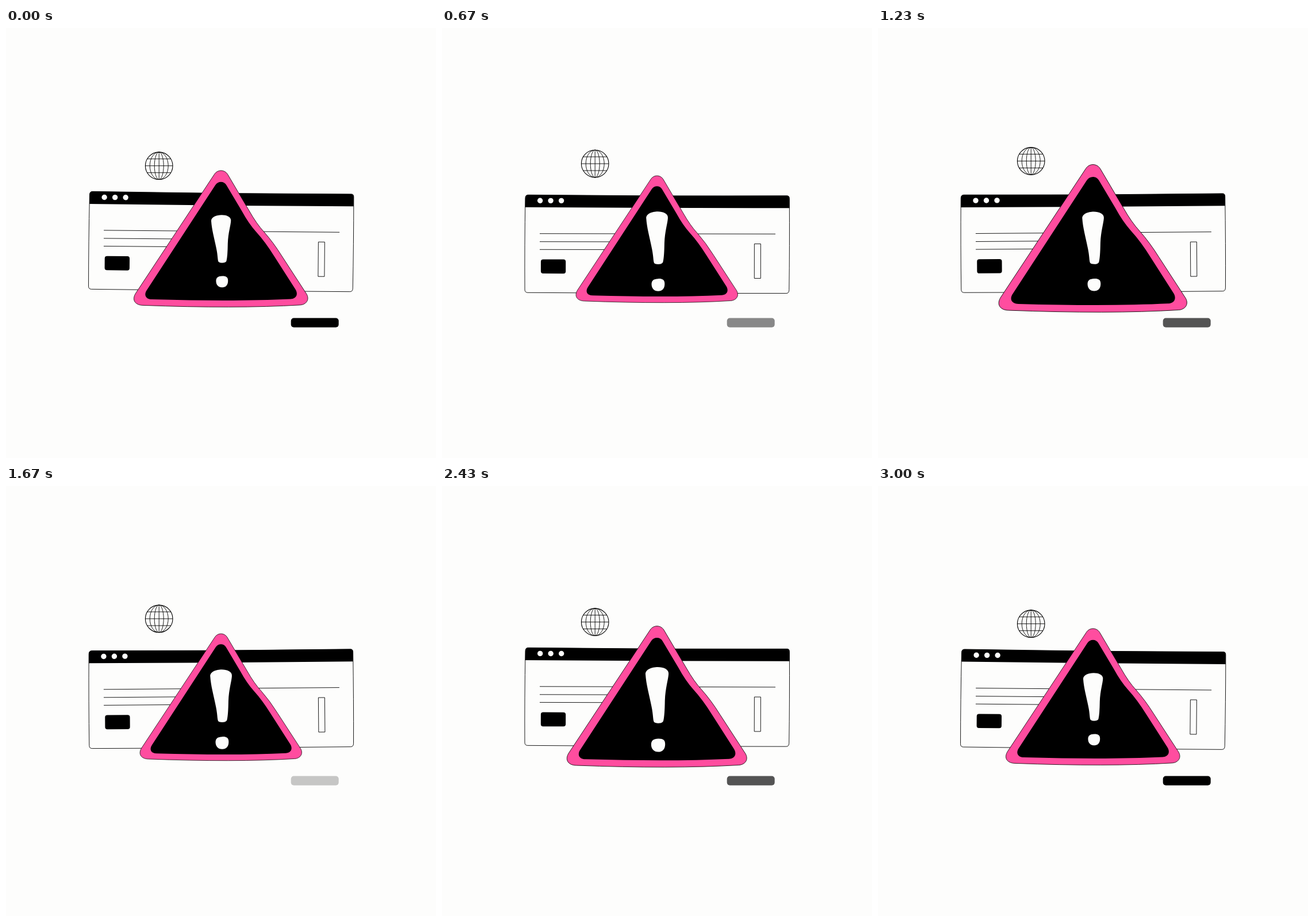
An HTML page with a canvas for the animation above (3030 ms loop, 748 px wide and 748 px high).

```html
<!DOCTYPE html>
<html lang="en">
<head>
<meta charset="utf-8">
<title>Warning</title>
<style>
html, body { margin: 0; width: 100%; height: 100%; overflow: hidden; background: #fdfdfc; }
canvas { display: block; width: 748px; height: 748px; }
</style>
</head>
<body>
<canvas id="stage" width="748" height="748"></canvas>
<script>
const ctx = document.getElementById('stage').getContext('2d');
const LOOP = 3030, FRAMES = 91, PULSE = 30;
const PAPER = '#fdfdfc', INK = '#000', PINK = '#ff4d9f';

const outer = new Path2D(
  'M362.5 254.5 C368 246 380 246 385.5 254.5 L423 318 Q436 341 449 355 Q465 373 480 397 L521 460' +
  ' C530 472 522 481.5 511 481.8 Q400 488.5 238 482.3 C225 482 218 473 226 461 Z');
const inner = new Path2D(
  'M364 273.5 C368.5 266 379.5 266 383.5 273.5 L410 318 Q422 340 435 354.5 Q451 372 466.5 397 L503 454' +
  ' C509 463 505 471 495 471.4 Q400 476 254 472 C243 472 239.5 464 245 456 Z');
const stem = new Path2D(
  'M357 336 C356 322.5 392 321 391.3 335 C391 343 386.5 356 385.8 375 Q385.5 397 383.5 405' +
  ' C382 410 371 409 369.5 406.5 C368 403 368.5 396 366 384 C362 364 358 351 357 336 Z');
const dot = new Path2D(
  'M376 431.5 C383 431.3 386.4 433.5 386.2 440 C386 447.5 382 451.2 376 451.2' +
  ' C369.5 451.2 365.6 447 365.4 440.5 C365.3 434 369 431.7 376 431.5 Z');
const frame = new Path2D(
  'M150 286.2 Q374 288.6 600 287 Q604.2 287 604.2 292 Q604.8 376 603.9 451 Q603.8 456.8 599 456.8' +
  ' Q374 457.6 149 456.2 Q144.2 456 144.2 451 Q143.6 376 144.8 292 Q144.8 286.2 150 286.2 Z');
const header = new Path2D(
  'M150 286.2 Q374 288 600 287 Q604.2 287 604.2 292 L604.2 308.4 Q374 309 144.6 307.8 L144.8 292 Q144.8 286.2 150 286.2 Z');

function line(x1, y1, x2, y2) {
  ctx.beginPath();
  ctx.moveTo(x1, y1);
  ctx.lineTo(x2, y2);
  ctx.stroke();
}

function disc(x, y, r) {
  ctx.beginPath();
  ctx.arc(x, y, r, 0, 7);
  ctx.fill();
}

function block(x, y, w, h, r) {
  ctx.beginPath();
  ctx.roundRect(x, y, w, h, r);
  ctx.fill();
}

function about(x, y, angle, scale, draw) {
  ctx.save();
  ctx.translate(x, y);
  ctx.rotate(angle);
  ctx.scale(scale, scale);
  ctx.translate(-x, -y);
  draw();
  ctx.restore();
}

function ease(u) {
  u = Math.min(1, Math.max(0, u));
  return u < 0.5 ? 8 * u ** 4 : 1 - 8 * (1 - u) ** 4;
}

// Swells over 15.1 frames, shrinks over 11.9, rests for 3.
function pulse(n, start) {
  const p = (n - start + 4 * PULSE) % PULSE;
  return ease(p / 15.1) - ease((p - 15.1) / 11.9);
}

// Sharp flash, decay, quick return.
function flash(n) {
  const p = n % 9;
  const fade = q => 0.15 + 0.85 * Math.exp(-q / 2);
  return p < 6 ? fade(p) : fade(6) + (1 - fade(6)) * (p - 6) / 3;
}

function drawGlobe(y) {
  const x = 266.2, r = 23.8;
  ctx.lineWidth = 1.1;
  ctx.beginPath();
  ctx.arc(x, y, r, 0, 7);
  ctx.stroke();
  ctx.lineWidth = 0.9;
  for (const rx of [8, 16]) {
    ctx.beginPath();
    ctx.ellipse(x, y, rx, r, 0, 0, 7);
    ctx.stroke();
  }
  line(x, y - r, x, y + r);
  for (const dy of [-12, 0, 12]) {
    const half = Math.sqrt(r * r - dy * dy);
    line(x - half, y + dy, x + half, y + dy);
  }
}

function drawWindow() {
  ctx.lineWidth = 0.9;
  ctx.stroke(frame);
  ctx.fill(header);
  ctx.fillStyle = PAPER;
  for (let i = 0; i < 3; i++) disc(170.5 + 18.5 * i, 296.2, 4.7);
  ctx.fillStyle = INK;
  line(170, 353.6, 580, 353.6);
  line(170, 367.6, 305, 367.6);
  line(170, 381.2, 305, 381.2);
  block(172, 398.4, 43.3, 24.6, 4);
  ctx.strokeRect(543.4, 370.8, 11, 60);
}

function drawSign(size, markSize) {
  about(374, 376, 0, size, () => {
    ctx.fillStyle = PINK;
    ctx.fill(outer);
    ctx.lineWidth = 0.8;
    ctx.stroke(outer);
    ctx.fillStyle = INK;
    ctx.fill(inner);
  });
  about(374.5, 384.5, 0, markSize, () => {
    ctx.fillStyle = PAPER;
    ctx.fill(stem);
    ctx.fill(dot);
  });
}

function render(time) {
  const n = Math.min(FRAMES - 1, Math.floor((time % LOOP + 5) * 0.03));
  const turn = 2 * Math.PI * n / FRAMES;
  const sway = Math.cos(turn), bob = Math.sin(turn);

  ctx.fillStyle = PAPER;
  ctx.fillRect(0, 0, 748, 748);
  ctx.fillStyle = ctx.strokeStyle = INK;

  drawGlobe(235.2 + 4.5 * sway);
  ctx.save();
  ctx.translate(0, 4.5 * bob);
  about(374, 371, 0.0083 * sway, 1, drawWindow);
  ctx.restore();

  drawSign(0.9307 + 0.1518 * pulse(n, 22.6), 1 + 0.17 * pulse(n, 29.2));

  ctx.globalAlpha = flash(n);
  ctx.fillStyle = INK;
  block(495.7, 504.5, 83, 16.2, 5);
  ctx.globalAlpha = 1;
}

const begin = performance.now();
function tick() {
  render(performance.now() - begin);
  requestAnimationFrame(tick);
}
tick();
</script>
</body>
</html>
```
